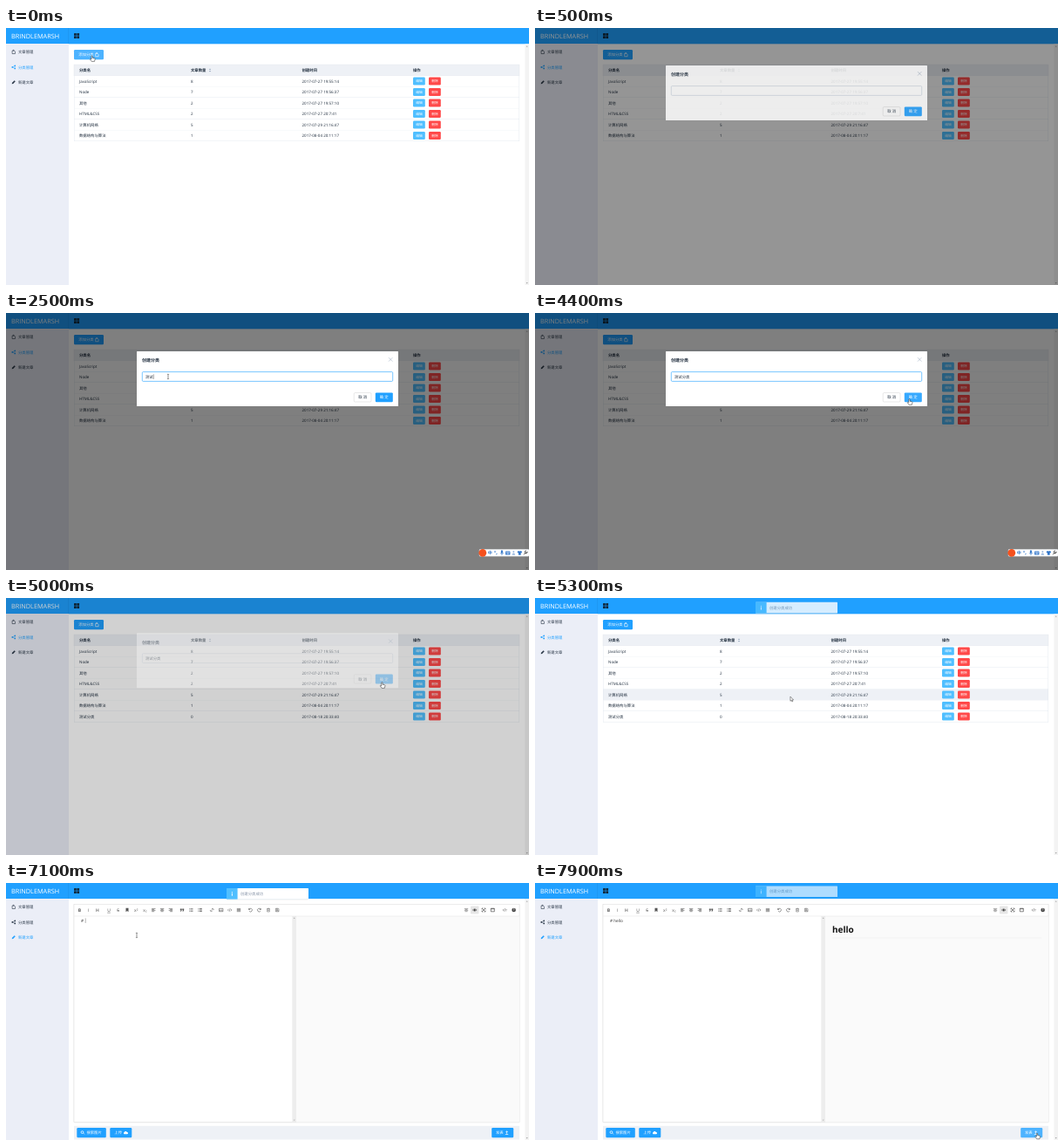
An HTML page for the animation above (8 s loop, 600 by 295 pixels).

```html
<!DOCTYPE html>
<html lang="zh-CN">
<head>
<meta charset="utf-8">
<title>Blog admin</title>
<style>
html, body { margin: 0; width: 100%; height: 100%; overflow: hidden; background: #fff; }
svg { display: block; width: 600px; height: 295px; }
text { font-family: "Open Sans", "Noto Sans CJK SC", "Noto Sans CJK", sans-serif; text-rendering: geometricPrecision; white-space: pre; }
</style>
</head>
<body>
<svg id="stage" viewBox="0 0 600 295"></svg>
<script>
const LOOP = 8000, CH = 4.375;
const BLUE = '#20a0ff', HOVER = '#4db3ff', INK = '#1f2d3d', PALE = '#eef1f6', LINE = '#dfe6ec';

// y is the vertical middle of the glyphs
const text = (x, y, s, size = CH, fill = INK, more = '') =>
  `<text x="${x}" y="${y + size * 0.37}" font-size="${size}" fill="${fill}" ${more}>${s.replace('&', '&amp;')}</text>`;
const rect = (x, y, w, h, fill, more = '') =>
  `<rect x="${x}" y="${y}" width="${w}" height="${h}" fill="${fill}" ${more}/>`;
const icon = (x, y, d, color = '#555', width = 0.6, fill = 'none') =>
  `<path transform="translate(${x} ${y})" d="${d}" fill="${fill}" stroke="${color}" stroke-width="${width}" stroke-linejoin="round"/>`;
const solid = (x, y, d, color) => icon(x, y, d, 'none', 0, color);
const group = (id, body, more = '') => `<g id="${id}" ${more}>${body}</g>`;
const MID = 'text-anchor="middle"', BOLD = 'font-weight="600"', R = 'rx="1.2"';
const button = (x, y, w, h, fill, label, size = CH, id = '') =>
  rect(x, y, w, h, fill, R + (id && ` id="${id}"`)) + text(x + w / 2, y + h / 2, label, size, '#fff', MID);

const DOC = 'M-1.6-1.4H.8L1.8-.4V2H-1.6ZM-.6-1.4V-2.2H.4V-1.4';
const PEN = 'M-2 2L-1.6.5L1-2.1L2.1-1L-.5 1.6Z';
const SHARE = 'M1.6-1.5L-1.4 0L1.6 1.5';
const CODE = 'M-1-1.3L-2.3 0L-1 1.3M1-1.3L2.3 0L1 1.3M.4-1.6L-.4 1.6';

function sidebar() {
  const names = ['文章管理', '分类管理', '新建文章'];
  const art = c => [
    icon(8.7, 0, DOC, c, 0.6),
    icon(8.7, 0, SHARE, c, 0.5) + [[1.6, -1.5], [-1.4, 0], [1.6, 1.5]]
      .map(([x, y]) => `<circle cx="${8.7 + x}" cy="${y}" r=".85" fill="${c}"/>`).join(''),
    solid(8.7, 0, PEN, c)
  ];
  const item = (i, c) => `<g transform="translate(0 ${27.5 + i * 17.4})">${art(c)[i]}${text(14, 0, names[i], CH, c)}</g>`;
  const menu = on => names.map((n, i) => item(i, i === on ? BLUE : '#2b3848')).join('');
  return rect(0, 18, 72, 277, '#ebeef7') + group('menuList', menu(1)) + group('menuNew', menu(2));
}

function header() {
  const tiles = [[78, 6], [81.3, 6], [78, 9.2], [81.3, 9.2]];
  return rect(0, 0, 600, 18.3, BLUE) + rect(71.2, 0, 0.5, 18.3, '#1b8fe6') +
    text(6, 9.3, 'BRINDLEMARSH', 7.3, '#fff') +
    tiles.map(([x, y]) => rect(x, y, 2.8, 2.7, '#10283c', 'rx=".5"')).join('');
}

const rowData = [
  ['JavaScript', '8', '2017-07-27 19:55:14'], ['Node', '7', '2017-07-27 19:56:37'],
  ['其他', '2', '2017-07-27 19:57:10'], ['HTML&CSS', '2', '2017-07-27 20:7:41'],
  ['计算机网络', '5', '2017-07-29 21:16:47'], ['数据结构与算法', '1', '2017-08-04 20:11:17'],
  ['测试分类', '0', '2017-08-18 20:33:40']
];
const cols = [84, 212, 339.5, 467];
const ROW = 12.5, TOP = 55;

function row(data, i) {
  const y = TOP + i * ROW, c = y + 6.1;
  return group('row' + i,
    rect(78, y, 511, ROW, '#fff', `id="bg${i}"`) +
    text(cols[0], c, data[0], /[A-Z]/.test(data[0]) ? 4.5 : CH) +
    text(cols[1], c, data[1], 4.5) + text(cols[2], c, data[2], 4.5) +
    button(467, y + 1.6, 13.8, 8.8, '#50bfff', '编辑', 3.75) +
    button(485, y + 1.6, 13.8, 8.8, '#ff4949', '删除', 3.75) +
    rect(78, y + ROW - 0.4, 511, 0.4, LINE) + rect(78, y, 0.4, ROW, LINE) + rect(588.6, y, 0.4, ROW, LINE));
}

function listPage() {
  const heads = ['分类名', '文章数量', '创建时间', '操作'];
  return rect(78, 25, 34, 11.3, BLUE, R + ' id="add"') +
    text(83.2, 30.7, '添加分类', CH, '#fff') + icon(104.3, 30.7, DOC, '#fff') +
    rect(78, 42, 511, 13, PALE, `stroke="${LINE}" stroke-width=".4"`) +
    heads.map((h, i) => text(cols[i], 48.6, h, CH, INK, BOLD)).join('') +
    solid(234, 48.5, 'M-1.2-.6L0-2L1.2-.6ZM-1.2.6L0 2L1.2 .6Z', '#97a8be') +
    rowData.map(row).join('') +
    rect(0, 132.8, 0, 6.6, '#3390ff', 'id="selBox"') +
    text(0, TOP + 6 * ROW + 6.1, '', CH, '#fff', 'id="selText"');
}

// four short bars, aligned by k: 0 left, .5 centre, 1 right
const bars = k => [4.4, 3, 4.4, 3].map((w, i) => `M${-2.2 + (4.4 - w) * k} ${-1.6 + i * 1.1}h${w}`).join('');
const LIST = 'M-.9-1.5H2.2M-.9 0H2.2M-.9 1.5H2.2M-2.2-1.5h.7M-2.2 0h.7M-2.2 1.5h.7';

function toolbar() {
  const y = 31, g = '#555';
  const letter = (x, s, more = '') => text(x, y, s, 5, g, MID + ' ' + more);
  return letter(84.5, 'B', 'font-weight="700"') + letter(94.5, 'I', 'font-style="italic"') +
    letter(105, 'H', BOLD) + letter(118, 'U', 'text-decoration="underline"') +
    letter(128.5, 'S', 'text-decoration="line-through"') +
    solid(139, y, 'M-1.5-2.2H1.5V2.2L0 .9L-1.5 2.2Z', g) +
    letter(149.2, 'x²') + letter(159.5, 'x₂') +
    [0, 0.5, 1].map((k, i) => icon(169.3 + i * 9.8, y, bars(k), g)).join('') +
    solid(202, y, 'M-2.2-1.6H-.3V.2L-1.2 1.7H-2L-1.4.2H-2.2ZM.3-1.6H2.2V.2L1.3 1.7H.5L1.1.2H.3Z', g) +
    icon(212.3, y, LIST, g) + icon(222.7, y, LIST, g, 0.75) +
    icon(236.3, y, 'M-.6.6L.6-.6M-.2-1L.8-2L2-.8L1 .2M.2 1L-.8 2L-2 .8L-1-.2', g) +
    icon(246.7, y, 'M-2.2-1.7H2.2V1.7H-2.2ZM-1.7 1.2L-.5-.2L.2.6L.8 0L1.7 1.2', g) +
    icon(256.7, y, CODE, g, 0.5) + icon(267, y, bars(0).replace(/h3/g, 'h4.4'), g) +
    icon(280.3, y, 'M-1.7-2V-.5H-.2M-1.6-.6A1.9 1.9 0 1 1-1.2 1.4', g) +
    icon(290.6, y, 'M1.7-2V-.5H.2M1.6-.6A1.9 1.9 0 1 0 1.2 1.4', g) +
    icon(301, y, 'M-2-1.3H2M-1.4-1.3V2H1.4V-1.3M-.6-1.3V-2H.6V-1.3M-.4-.4V1.2M.4-.4V1.2', g, 0.45) +
    icon(311.2, y, 'M-1.8-1.8H1.2L1.8-1.2V1.8H-1.8ZM-.9-1.8V-.6H.7V-1.8M-1 1.8V.5H1V1.8', g, 0.5) +
    rect(533, 26.4, 9.4, 9.2, '#e6e6e6', 'rx=".8"') + icon(528, y, bars(0.5), g, 0.5) +
    icon(537.7, y, 'M-2.4 0Q0-2.8 2.4 0Q0 2.8-2.4 0Z', '#333', 0.5) + `<circle cx="537.7" cy="${y}" r=".9" fill="#333"/>` +
    icon(548, y, 'M-1.6-1.6L1.6 1.6M1.6-1.6L-1.6 1.6M-2-.6V-2H-.6M.6-2H2V-.6M2 .6V2H.6M-.6 2H-2V.6', '#444', 0.6) +
    icon(558.3, y, 'M-2-1.8H2V1.8H-2ZM-2-1.3H2', '#444', 0.65) +
    icon(572.2, y, CODE, g, 0.5) +
    `<circle cx="582.6" cy="${y}" r="2.3" fill="#444"/>` + text(582.6, y, '?', 3.6, '#fff', MID + ' font-weight="700"');
}

function editorPage() {
  return rect(72, 18.3, 523, 277, '#fff') +
    rect(77.7, 24.3, 511.6, 251, '#ccc', 'opacity=".45" rx=".8"') +
    rect(78, 24.2, 511, 250.5, '#fff', 'stroke="#d4d4d4" stroke-width=".4"') +
    rect(333, 38, 255.8, 236.5, '#fafafa') + rect(328.3, 38, 4.7, 236.5, '#ededed') +
    solid(330.7, 40.2, 'M-.9.5L0-.6L.9.5Z', '#999') + solid(330.7, 272.2, 'M-.9-.5L0 .6L.9-.5Z', '#999') +
    rect(78, 37.8, 511, 0.4, '#ddd') + toolbar() +
    text(86, 43.2, '', 4.7, '#333', 'id="code"') + rect(0, 40.4, 0.35, 5.6, '#333', 'id="editCaret"') +
    group('preview', text(341, 53.5, '', 10, '#111', 'font-weight="700" id="title"') + rect(341, 62.8, 240, 0.4, '#e4e4e4')) +
    rect(78, 278.8, 511, 15.7, PALE) +
    rect(81.3, 281, 33.5, 11.3, BLUE, R) + text(92.4, 286.7, '搜索图片', CH, '#fff') +
    icon(88, 286.5, 'M1 .8L2 1.9M.9-.4A1.4 1.4 0 1 1-1.9-.4A1.4 1.4 0 1 1 .9-.4', '#fff', 0.75) +
    rect(119.3, 281, 25, 11.3, BLUE, R) + text(124.3, 286.7, '上传', CH, '#fff') +
    solid(137.3, 286.7, 'M-1.6 1.6A1.3 1.3 0 0 1-1.6-.7A1.7 1.7 0 0 1 1.5-.8A1.2 1.2 0 0 1 1.6 1.6Z', '#fff') +
    rect(557.2, 281, 25, 11.3, BLUE, R + ' id="publish"') + text(562, 286.7, '发表', CH, '#fff') +
    icon(574.5, 286.7, 'M-1.7 1.8H1.7M0 1V-1.8M-1.3-.6L0-1.9L1.3-.6', '#fff', 0.7);
}

function dialog() {
  return rect(150, 44, 300, 63, '#fff', 'rx=".6"') +
    text(156, 54.6, '创建分类', 5, INK, BOLD) +
    icon(441.2, 53.4, 'M-2.2-2.2L2.2 2.2M2.2-2.2L-2.2 2.2', '#97a8be', 0.55) +
    rect(156.3, 67.6, 287.4, 10.8, '#fff', 'id="field" rx="1.1" stroke-width=".6"') +
    text(160, 73.1, '', CH, INK, 'id="value"') + rect(0, 70.3, 0.35, 5.6, '#111', 'id="caret"') +
    rect(399.2, 91.6, 19.8, 10.4, '#fff', R + ' stroke="#c4c4c4" stroke-width=".4"') +
    text(409.1, 96.8, '取 消', CH, INK, MID) +
    button(423.8, 91.4, 20, 10.8, BLUE, '确 定', CH, 'ok');
}

function message() {
  return rect(253, 6.4, 94, 13, '#000', 'opacity=".07" rx=".8"') +
    rect(253, 6, 94, 12.6, '#fff', 'rx=".6"') + rect(253, 6, 12.6, 12.6, '#50bfff') +
    rect(258.9, 10, 0.9, 0.9, '#fff') + rect(258.9, 11.6, 0.9, 3.2, '#fff') +
    text(269, 12.3, '创建分类成功', CH, '#8492a6');
}

function inputBar() {
  const c = '#2f74c8', y = 275.3;
  return rect(543, 271.3, 57, 8, '#fff', 'rx="1" stroke="#d5dde6" stroke-width=".3"') +
    `<circle cx="546.8" cy="${y}" r="4.4" fill="#f4511e"/>` +
    text(555.2, y, '中', 5, c, MID + ' font-weight="700"') +
    `<circle cx="561" cy="274" r=".8" fill="none" stroke="${c}" stroke-width=".5"/>` +
    icon(563, 276.3, 'M.2-.4L-.4 1', c, 0.9) +
    rect(567.9, 272.3, 2, 3.6, c, 'rx="1"') + icon(568.9, y, 'M-1.7-.2Q-1.6 1.5 0 1.5Q1.6 1.5 1.7-.2M0 1.5V2.8', c, 0.5) +
    rect(573, 273.4, 5.4, 4, c, 'rx=".5"') + icon(575.7, y, 'M-2-.8H2M-2 .3H2M-1.2 1.2H1.2', '#fff', 0.45) +
    `<circle cx="582.3" cy="273.9" r="1" fill="#9dbbe0"/>` + solid(582.3, 277, 'M-1.8 .8Q-1.6-1.6 0-1.6Q1.6-1.6 1.8 .8Z', '#9dbbe0') +
    solid(589.3, y, 'M-2.8-1.4L-1-2.4Q0-1.4 1-2.4L2.8-1.4L2.1.1L1.4-.2V2.4H-1.4V-.2L-2.1.1Z', c) +
    icon(596, y, 'M-1.9 2L.7-.6M1.9-1.5A1.4 1.4 0 1 1 .8-2.3', '#333', 0.9);
}

const scrollbar = rect(595.4, 18.3, 4.6, 277, '#f3f3f3') +
  solid(597.7, 21, 'M-1 .6L0-.6L1 .6Z', '#888') + solid(597.7, 292.8, 'M-1-.6L0 .6L1-.6Z', '#888');

const pointers =
  group('arrow', '<path d="M0 0V5.2L1.2 4.1L2 5.9L2.8 5.5L2 3.8H3.6Z" fill="#fff" stroke="#222" stroke-width=".45"/>') +
  group('hand', '<path d="M-.6 .5Q0-.4.6.5V2.6L3 3.1Q3.7 3.4 3.5 4.4L2.9 6.8H-.3L-2.2 4.2Q-1.9 3.2-.6 4.2Z" fill="#fff" stroke="#222" stroke-width=".5"/>') +
  group('beam', '<path d="M-1.1-2.6H-.3L0-2.3L.3-2.6H1.1M0-2.3V2.3M-1.1 2.6H-.3L0 2.3L.3 2.6H1.1" fill="none" stroke="#222" stroke-width=".5"/>');

document.getElementById('stage').innerHTML =
  rect(0, 0, 600, 295, '#fff') + header() + sidebar() + scrollbar +
  group('listPage', listPage()) + group('editorPage', editorPage()) +
  rect(0, 0, 600, 295, '#000', 'id="shade"') + group('dialog', dialog()) +
  group('message', message()) + group('inputBar', inputBar()) + group('cursor', pointers);

const $ = id => document.getElementById(id);
const set = (id, key, v) => $(id).setAttribute(key, v);
const show = (id, on) => set(id, 'display', on ? 'inline' : 'none');
const clamp = v => Math.max(0, Math.min(1, v));
const ramp = (t, start, len) => clamp((t - start) / len);

// time, x, y of the pointer's hot spot
const path = [
  [0, 98.6, 31.6], [400, 98.6, 31.6], [1050, 186, 73], [3850, 186, 73], [4350, 429.4, 98.6],
  [4600, 429.4, 98.6], [4800, 431.4, 96.6], [5100, 431.4, 96.6], [5550, 102, 136], [5650, 102, 136],
  [5900, 88.5, 136], [6000, 88.5, 136], [6350, 23, 89], [6450, 23, 89], [6600, 24, 62],
  [6720, 24, 62], [6950, 150, 60], [7500, 150, 60], [7800, 576, 287], [8000, 576, 287]
];
function pointerAt(t) {
  const i = path.findIndex(p => p[0] > t), a = path[i - 1], b = path[i];
  let k = (t - a[0]) / (b[0] - a[0]);
  k = k * k * (3 - 2 * k);
  return [a[1] + (b[1] - a[1]) * k, a[2] + (b[2] - a[2]) * k];
}
const inside = (x, y, l, t, r, b) => x > l && x < r && y > t && y < b;

function draw(t) {
  const [x, y] = pointerAt(t);
  const editing = t >= 6680, modal = t >= 300 && t < 5110;
  show('listPage', !editing); show('editorPage', editing);
  show('menuList', !editing); show('menuNew', editing);

  // list page
  set('add', 'fill', t < 350 ? HOVER : BLUE);
  show('row6', t >= 4850);
  const hover = t < 5150 ? -1 : t < 5550 ? Math.floor((y - TOP) / ROW) : 6;
  rowData.forEach((r, i) => set('bg' + i, 'fill', i === hover ? PALE : '#fff'));
  const picked = t < 5650 ? 0 : Math.min(3, Math.floor((t - 5600) / 80));
  const selX = cols[0] + CH * (4 - picked);
  set('selBox', 'x', selX); set('selBox', 'width', CH * picked);
  set('selText', 'x', selX);
  $('selText').textContent = picked ? '测试分类'.slice(-picked) : '';

  // dialog
  const open = ramp(t, 260, 290) * (1 - ramp(t, 4810, 300));
  show('shade', modal); show('dialog', modal);
  set('shade', 'opacity', open * 0.5);
  set('dialog', 'opacity', open);
  set('dialog', 'transform', `translate(0 ${-6 * (1 - open)})`);
  const focused = t >= 1300 && t < 4600;
  set('field', 'stroke', focused ? BLUE : '#bfcbd9');
  const value = t < 2300 ? '' : t < 3650 ? '测试' : '测试分类';
  $('value').textContent = value;
  const typedAt = t < 2300 ? 1300 : t < 3650 ? 2300 : 3650;
  show('caret', focused && (t - typedAt) % 1000 < 500);
  set('caret', 'x', 160.2 + value.length * CH);
  show('inputBar', t >= 1400 && t < 4700);

  // notice
  const note = ramp(t, 5030, 300) * (1 - ramp(t, 7840, 300));
  set('message', 'opacity', note * note);
  set('message', 'transform', `translate(0 ${-12.5 * (1 - note)})`);

  // editor
  const typed = '# hello'.slice(0, Math.max(0, Math.floor((t - 6950) / 70)));
  $('code').textContent = typed;
  $('title').textContent = typed.slice(2);
  show('preview', typed.length > 2);
  show('editCaret', t >= 6950 && t < 7550);
  set('editCaret', 'x', 86.3 + typed.length * 2.3);

  // pointer
  const onOk = modal && inside(x, y, 424, 91, 444, 102);
  const onPublish = editing && inside(x, y, 557, 281, 582, 293);
  set('ok', 'fill', onOk && t < 4600 ? '#36a9ff' : BLUE);
  set('publish', 'fill', onPublish ? HOVER : BLUE);
  const hand = t < 400 || onOk || onPublish || (t > 6450 && inside(x, y, 0, 19, 72, 71));
  const beam = !hand && ((modal && inside(x, y, 156, 67, 444, 79)) ||
    (!modal && !editing && inside(x, y, 84, 131, 103, 142)) ||
    (editing && inside(x, y, 78, 38, 328, 274)));
  show('cursor', t < 400 || t > 700);
  show('hand', hand); show('beam', beam); show('arrow', !hand && !beam);
  set('cursor', 'transform', `translate(${x} ${y})`);
}

const begin = performance.now();
function tick() {
  draw((performance.now() - begin) % LOOP);
  requestAnimationFrame(tick);
}
tick();
</script>
</body>
</html>
```
